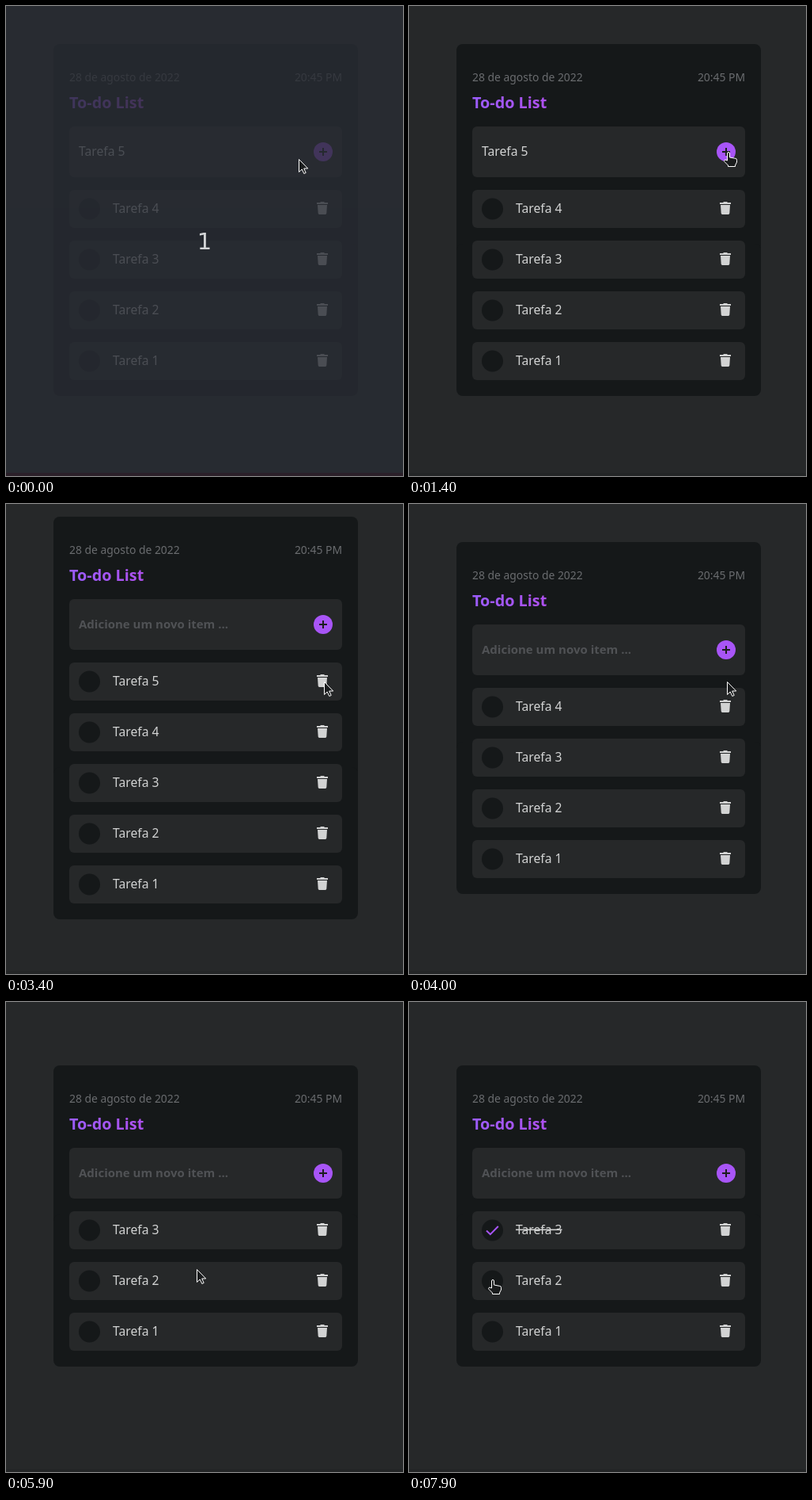
Write an HTML page that moves like this. It is 502 px wide and 593 px high and loops after 8 s.

```html
<!DOCTYPE html>
<html lang="pt">
<head>
<meta charset="utf-8">
<title>To-do List</title>
<style>
html, body { margin: 0; width: 100%; height: 100%; overflow: hidden; background: #262829; }
svg { display: block; width: 100%; height: 100%; }
text { font: 15.7px "Noto Sans", "Open Sans", sans-serif; fill: #d2d3d3; }
.small { font-size: 13.9px; fill: #6a6c6f; }
.title { font-size: 19.8px; font-weight: 700; fill: url(#violet); }
.hint { font-size: 15px; font-weight: 700; fill: #505255; }
.end { text-anchor: end; }
.card { fill: #151819; }
.panel { fill: #262829; }
.purple { fill: #a855f7; }
.icon { fill: #d2d3d3; }
.count { font: 29px "DejaVu Sans", sans-serif; fill: #d2d4d6; text-anchor: middle; }

.anim { animation: 8s step-end infinite; }
.head { animation-name: head; }
.rows { animation-name: rows; }
.typed { animation-name: typed; }
.hint { animation-name: hint; }
.fifth { animation-name: fifth; }
.fourth { animation-name: fourth; }
.check { animation-name: check; }
.done { animation-name: done; }
.cover { animation-name: cover; }
.cursor { animation-name: move; }
.hand { animation-name: hand; }
.arrow { animation-name: arrow; }

/* the card stays centred while its list grows and shrinks */
@keyframes head {
  0%, 50% { transform: translateY(0); }
  27.5% { transform: translateY(-32px); }
  65%, 100% { transform: translateY(32px); }
}
@keyframes rows {
  0%, 50% { transform: translateY(0); }
  27.5% { transform: translateY(32px); }
  65%, 100% { transform: translateY(-32px); }
}
@keyframes typed { 0% { opacity: 1; } 27.5%, 100% { opacity: 0; } }
@keyframes hint { 0% { opacity: 0; } 27.5%, 100% { opacity: 1; } }
@keyframes fifth { 0%, 50%, 100% { opacity: 0; } 27.5% { opacity: 1; } }
@keyframes fourth { 0% { opacity: 1; } 65%, 100% { opacity: 0; } }
@keyframes check { 0% { opacity: 0; } 85%, 100% { opacity: 1; } }
@keyframes done { 0% { text-decoration: none; } 85%, 100% { text-decoration: line-through; } }
@keyframes cover { 0% { opacity: 1; } 1.25%, 100% { opacity: 0; } }
@keyframes hand {
  0%, 27.5%, 88.75% { opacity: 0; }
  15%, 81.25%, 97.5%, 100% { opacity: 1; }
}
@keyframes arrow {
  0%, 27.5%, 88.75% { opacity: 1; }
  15%, 81.25%, 97.5%, 100% { opacity: 0; }
}
/* pointer hot spot, ten positions per second */
@keyframes move {
  0% { transform: translate(370px, 193px); }
  1.25% { transform: translate(370px, 193px); animation-timing-function: steps(4); }
  6.25% { transform: translate(293px, 191px); }
  8.75% { transform: translate(293px, 191px); animation-timing-function: steps(4); }
  13.75% { transform: translate(385px, 188px); animation-timing-function: steps(3); }
  17.5% { transform: translate(403px, 185px); }
  31.25% { transform: translate(403px, 185px); animation-timing-function: steps(3); }
  35% { transform: translate(390px, 212px); animation-timing-function: steps(2); }
  37.5% { transform: translate(381px, 232px); }
  38.75% { transform: translate(386px, 239px); animation-timing-function: steps(3); }
  42.5% { transform: translate(402px, 224px); }
  50% { transform: translate(402px, 224px); animation-timing-function: steps(8); }
  60% { transform: translate(399px, 252px); }
  65% { transform: translate(399px, 252px); animation-timing-function: steps(3); }
  68.75% { transform: translate(372px, 290px); animation-timing-function: steps(4); }
  73.75% { transform: translate(241px, 337px); }
  75% { transform: translate(191px, 326px); animation-timing-function: steps(3); }
  78.75% { transform: translate(121px, 295px); }
  81.25% { transform: translate(106px, 290px); }
  86.25% { transform: translate(106px, 290px); animation-timing-function: steps(4); }
  91.25% { transform: translate(123px, 312px); animation-timing-function: steps(5); }
  97.5% { transform: translate(114px, 348px); }
  98.75%, 100% { transform: translate(105px, 351px); }
}
</style>
</head>
<body>
<svg viewBox="0 0 502 593">
  <defs>
    <linearGradient id="violet">
      <stop stop-color="#9b5cfc"/>
      <stop offset="1" stop-color="#ae50ee"/>
    </linearGradient>
    <g id="row">
      <rect class="panel" x="80" width="345" height="48" rx="6"/>
      <circle class="card" cx="105.5" cy="24" r="13.5"/>
      <path class="icon" transform="translate(393 15)"
        d="M0 1h4l1-1h4l1 1h4v2H0zM1 4h12l-.7 10.6a1.5 1.5 0 0 1-1.5 1.4H3.2a1.5 1.5 0 0 1-1.5-1.4z"/>
    </g>
  </defs>

  <rect class="panel" width="502" height="593"/>
  <rect y="589" width="502" height="4" fill="#232526"/>

  <g class="anim head">
    <rect class="card" x="60" y="48" width="385" height="340" rx="8"/>
    <text class="small" x="80" y="95">28 de agosto de 2022</text>
    <text class="small end" x="425" y="95">20:45 PM</text>
    <text class="title" x="80" y="129">To-do List</text>
    <rect class="panel" x="80" y="152" width="345" height="64" rx="6"/>
    <text class="anim typed" x="92" y="189">Tarefa 5</text>
    <text class="anim hint" x="92" y="189">Adicione um novo item ...</text>
    <circle class="purple" cx="401" cy="184" r="12"/>
    <path d="M396 184h10M401 179v10" stroke="#1b1d1e" stroke-width="2"/>
  </g>

  <g class="anim rows">
    <rect class="card" x="60" y="300" width="385" height="192" rx="8"/>
    <g class="anim fifth"><use href="#row" y="168"/><text x="135" y="197">Tarefa 5</text></g>
    <g class="anim fourth"><use href="#row" y="232"/><text x="135" y="261">Tarefa 4</text></g>
    <use href="#row" y="296"/><text class="anim done" x="135" y="325">Tarefa 3</text>
    <path class="anim check" d="M98 320.5l4.8 4.7 10-10.2" fill="none" stroke="#a855f7" stroke-width="2"/>
    <use href="#row" y="360"/><text x="135" y="389">Tarefa 2</text>
    <use href="#row" y="424"/><text x="135" y="453">Tarefa 1</text>
  </g>

  <g class="anim cover">
    <rect width="502" height="593" fill="#282c34" fill-opacity=".8"/>
    <rect y="589" width="502" height="4" fill="#2b2029"/>
    <text class="count" x="251" y="307">1</text>
  </g>

  <g class="anim cursor" fill="#1a1c1d" stroke="#fff" stroke-linejoin="round">
    <path class="anim arrow" d="M.5.5V16.5l3.7-3.5 2.6 5.5 2.4-1.1-2.5-5.4h5z"/>
    <g class="anim hand">
      <path transform="translate(-5 -1)"
        d="M4.5 11V2a1.5 1.5 0 0 1 3 0v5l7 1.3a2 2 0 0 1 2 2V13l-2 4v1.5h-9V17L1 12.5a1.4 1.4 0 0 1 2-2z"/>
    </g>
  </g>
</svg>
</body>
</html>
```
